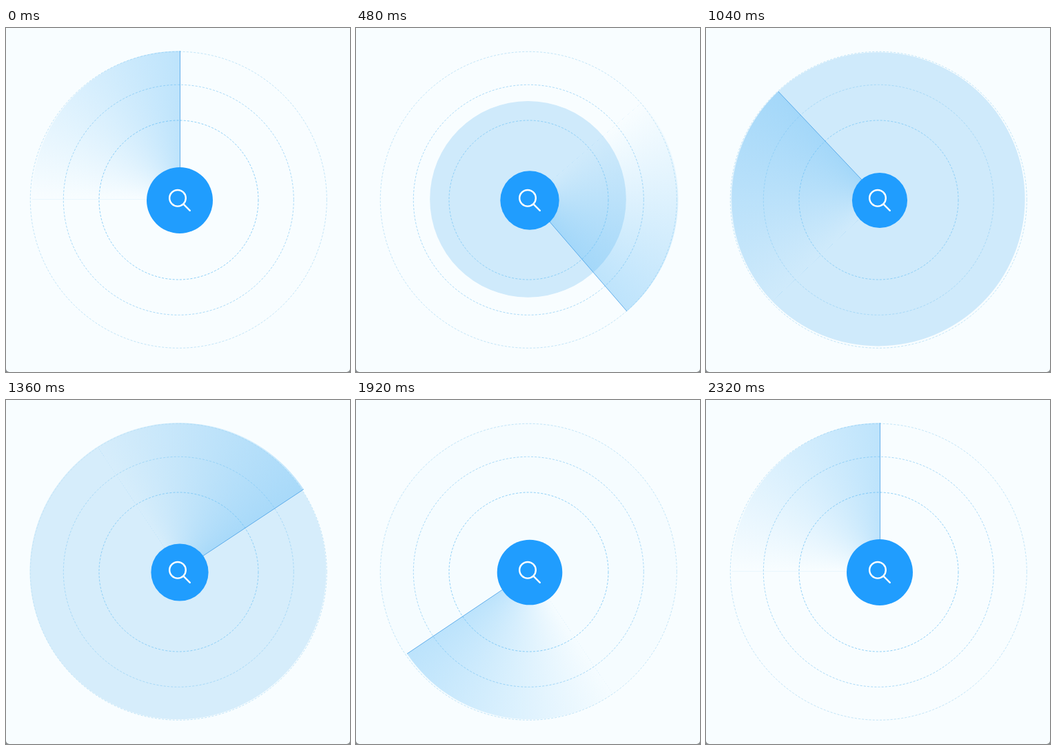
Write an HTML page with a canvas that moves like this. It is 499 px wide and 499 px high and loops after 2.4 s.

```html
<!DOCTYPE html>
<html lang="en">
<head>
<meta charset="utf-8">
<title>Radar search</title>
<style>
  html, body { margin: 0; width: 100%; height: 100%; overflow: hidden; background: #858a8d; }
  canvas { display: block; width: 499px; height: 499px; }
</style>
</head>
<body>
<canvas id="stage" width="499" height="499"></canvas>
<script>
const ctx = document.getElementById('stage').getContext('2d');
const LOOP = 2400, STEP = 80;
const START = 40, HALF = 1140;
const TAU = Math.PI * 2;

// [time in ms, clockwise degrees from the top]
const SWEEP = [[0, 0], [40, 0], [320, 88], [720, 216], [1040, 316.6],
  [1360, 416.5], [1920, 596.1], [2320, 720], [2400, 720]];

// [centre x, centre y, radius, colour]
const RINGS = [
  [250.5, 249.5, 115.5, '#8bcff8'],
  [250.3, 249.3, 167, '#a6d9f8'],
  [250.3, 249.3, 215, '#c0e4f8']
];

const clamp = v => Math.min(1, Math.max(0, v));
const mix = (a, b, k) => a + (b - a) * k;

// cubic-bezier(.25, .1, .25, 1)
function ease(x) {
  const curve = (u, a, b) => 3 * u * (1 - u) ** 2 * a + 3 * u * u * (1 - u) * b + u ** 3;
  let lo = 0, hi = 1;
  for (let i = 0; i < 24; i++) {
    const mid = (lo + hi) / 2;
    if (curve(mid, .25, .25) < x) lo = mid; else hi = mid;
  }
  return curve(lo, .1, 1);
}

function track(keys, t) {
  const i = Math.max(1, keys.findIndex(k => k[0] >= t));
  const [t0, a] = keys[i - 1], [t1, b] = keys[i];
  return mix(a, b, clamp((t - t0) / (t1 - t0)));
}

function disc(x, y, r, fill) {
  ctx.beginPath();
  ctx.arc(x, y, r, 0, TAU);
  ctx.fillStyle = fill;
  ctx.fill();
}

function drawBase() {
  ctx.clearRect(0, 0, 499, 499);
  ctx.fillStyle = '#f8fdff';
  ctx.beginPath();
  ctx.roundRect(0, 0, 499, 499, [0, 0, 5, 5]);
  ctx.fill();
}

function drawRings() {
  ctx.lineWidth = 1;
  ctx.setLineDash([3, 2.2]);
  for (const [x, y, r, color] of RINGS) {
    ctx.strokeStyle = color;
    ctx.beginPath();
    ctx.arc(x, y, r, 0, TAU);
    ctx.stroke();
  }
  ctx.setLineDash([]);
}

function drawSweep(deg) {
  const x = 252.5, y = 248.2, r = 215;
  const end = (deg % 360 - 90) * Math.PI / 180;
  const begin = end - Math.PI / 2;
  const fill = ctx.createConicGradient(begin, x, y);
  fill.addColorStop(0, 'rgba(90,184,246,0)');
  fill.addColorStop(.25, 'rgba(90,184,246,.37)');
  fill.addColorStop(1, 'rgba(90,184,246,.37)');
  ctx.fillStyle = fill;
  ctx.beginPath();
  ctx.moveTo(x, y);
  ctx.arc(x, y, r, begin, end);
  ctx.fill();

  ctx.strokeStyle = 'rgba(60,154,228,.75)';
  ctx.lineWidth = 1;
  ctx.beginPath();
  ctx.moveTo(x, y);
  ctx.lineTo(x + r * Math.cos(end), y + r * Math.sin(end));
  ctx.stroke();
}

function drawIcon() {
  ctx.strokeStyle = '#fff';
  ctx.lineWidth = 2.4;
  ctx.lineCap = 'round';
  ctx.beginPath();
  ctx.arc(249, 246.8, 11.8, 0, TAU);
  ctx.moveTo(257.8, 255.8);
  ctx.lineTo(266.8, 264.8);
  ctx.stroke();
  ctx.lineCap = 'butt';
}

function draw(t) {
  const grow = ease(clamp((t - START) / HALF));
  const fade = ease(clamp((t - START - HALF) / HALF));

  drawBase();
  ctx.globalAlpha = 1 - fade;
  disc(249.5, 248.3, 215 * grow, '#cfeafb');
  ctx.globalAlpha = 1;
  drawRings();
  drawSweep(track(SWEEP, t));
  disc(252, 250, 48 - 8 * (grow - fade), '#209dfe');
  drawIcon();
}

const origin = performance.now();
function frame() {
  const t = (performance.now() - origin) % LOOP;
  draw(Math.floor(t / STEP) * STEP);
  requestAnimationFrame(frame);
}
frame();
</script>
</body>
</html>
```
